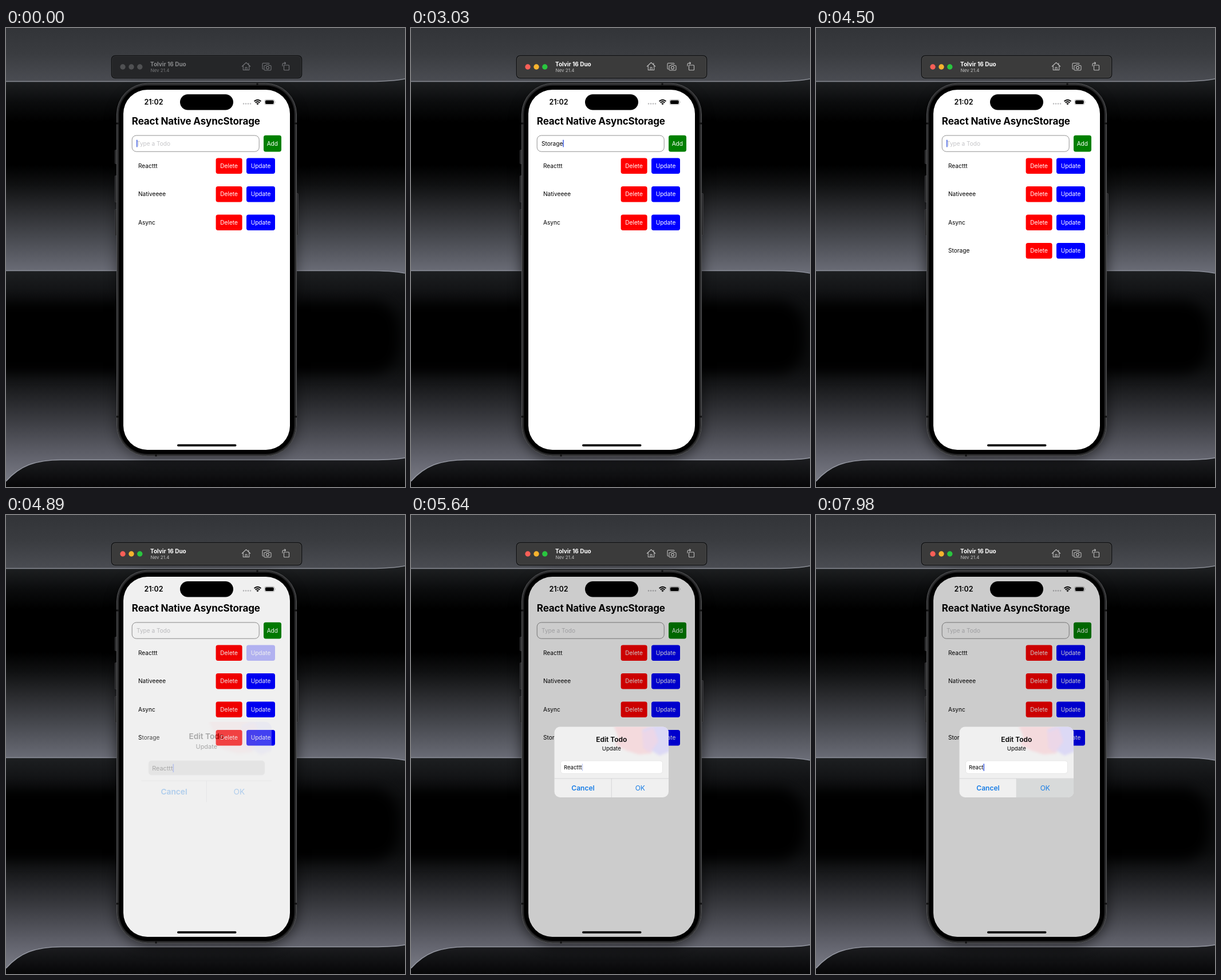
Recreate the animation shown at these times as an HTML page. Size 697 by 803 pixels, loop 8 s.

```html
<!DOCTYPE html>
<html lang="en">
<head>
<meta charset="utf-8">
<title>Todo app demo</title>
<style>
  html, body { margin: 0; width: 100%; height: 100%; overflow: hidden; background: #000; }
  svg { display: block; width: 697px; height: 803px; }
  text { font: 400 10.1px Inter, "Liberation Sans", sans-serif; white-space: pre; }
  .mid { text-anchor: middle; }
  .white { fill: #fff; }
  .link { font-size: 12px; fill: #187de6; }
  .semi { font-weight: 600; }
  #bar { --bg: #3b3b3b; --edge: #555; --title: #fff; --sub: #c4c4c4; --icon: #bdbdbd; --r: #f85f57; --y: #f6b32e; --g: #29c63f; }
  #bar.idle { --bg: #252628; --edge: #3c3d3f; --title: #87888a; --sub: #77787a; --icon: #75767a; --r: #505153; --y: #505153; --g: #505153; }
  #icons { fill: none; stroke: var(--icon); stroke-width: 1.1; stroke-linejoin: round; }
</style>
</head>
<body>
<svg viewBox="0 0 697 803">
  <defs id="defs">
    <filter id="soft" x="-30%" y="-30%" width="160%" height="160%"><feGaussianBlur stdDeviation="11"/></filter>
    <filter id="haze" x="-30%" y="-30%" width="160%" height="160%"><feGaussianBlur stdDeviation="2"/></filter>
    <clipPath id="screen"><rect x="205" y="108" width="291" height="630" rx="42"/></clipPath>
    <clipPath id="card"><rect x="250.5" y="370.5" width="199.5" height="123.5" rx="10"/></clipPath>
  </defs>

  <g id="wall">
    <rect width="697" height="96" fill="url(#band1)"/>
    <path d="M0 93.500H635Q675 93.500 697 89V430H0Z" fill="url(#band2)"/>
    <path d="M0 424.500H630Q675 424.500 697 429V803H0Z" fill="url(#band3)"/>
    <rect x="-60" y="478" width="748" height="126" rx="50" filter="url(#soft)"/>
    <path d="M0 793C24 766 50 756 96 755.500H640Q680 755.500 697 752V803H0Z" fill="url(#band4)"/>
    <g fill="none" stroke-width="1.500">
      <path d="M0 93.500H635Q675 93.500 697 89" stroke="#888b93"/>
      <path d="M0 424.500H630Q675 424.500 697 429" stroke="#8b8e99"/>
      <path d="M0 793C24 766 50 756 96 755.500H640Q680 755.500 697 752" stroke="#9497a1"/>
    </g>
  </g>

  <rect id="shadow" x="192" y="104" width="317" height="652" rx="62" filter="url(#soft)"/>

  <g id="bar">
    <rect x="184.500" y="48.500" width="332" height="39" rx="6" fill="var(--bg)" stroke="#101112" stroke-width="1.500"/>
    <rect x="185.500" y="49.500" width="330" height="37" rx="5" fill="none" stroke="var(--edge)" stroke-width=".6"/>
    <circle cx="204" cy="68" r="4.700" fill="var(--r)"/>
    <circle cx="219" cy="68" r="4.700" fill="var(--y)"/>
    <circle cx="233.800" cy="68" r="4.700" fill="var(--g)"/>
    <text x="252" y="66.500" style="font-size:10px;font-weight:700" fill="var(--title)">Tolvir 16 Duo</text>
    <text x="252.500" y="77" style="font-size:8px" fill="var(--sub)">Nev 21.4</text>
    <g id="icons">
      <path d="M412 67.500L419.500 60.500L427 67.500M414.300 66V73.500H424.700V66M423.800 64V61.300M418 73.500V69H421V73.500"/>
      <path d="M450 72H449.500Q448 72 448 70.500V63Q448 61.500 449.500 61.500H458.500Q460 61.500 460 63"/>
      <path d="M452.500 65.500H454L455 64H458.500L459.500 65.500H461.500Q463 65.500 463 67V72.500Q463 74 461.500 74H452.500Q451 74 451 72.500V67Q451 65.500 452.500 65.500Z"/>
      <circle cx="457" cy="69.500" r="2.400"/>
      <rect x="485.500" y="65" width="9" height="8.800" rx="1"/>
      <path d="M483 67V64Q483 61.500 485.500 61.500H488M486.500 59.500L488.500 61.500L486.500 63.500"/>
    </g>
  </g>

  <g id="phone">
    <g fill="#29292b" stroke="#4b4b4d" stroke-width=".6">
      <rect x="190.300" y="213.500" width="5" height="24" rx="1"/>
      <rect x="190.300" y="258.500" width="5" height="46" rx="1"/>
      <rect x="190.300" y="317.500" width="5" height="46" rx="1"/>
      <rect x="505.500" y="289.500" width="5" height="73" rx="1"/>
    </g>
    <rect x="193.500" y="97" width="314" height="652" rx="54" fill="#1c1c1d" stroke="#58595b"/>
    <rect x="195.300" y="98.800" width="310.400" height="648.400" rx="52" fill="none" stroke="#333335" stroke-width="1.600"/>
    <rect x="197.500" y="101" width="306" height="644" rx="50"/>
    <path d="M439 96.500V100M262 746V749.500M193 167H197M504 167H508M193 680H197M504 680H508" stroke="#111" stroke-width="3"/>
  </g>

  <g clip-path="url(#screen)">
    <rect x="205" y="108" width="291" height="630" fill="#fff"/>
    <text x="241.500" y="134" class="semi" style="font-size:12.500px">21:02</text>
    <g fill="#b9b9bb">
      <circle cx="415" cy="132.500" r="1.250"/><circle cx="419" cy="132.500" r="1.250"/>
      <circle cx="423" cy="132.500" r="1.250"/><circle cx="427" cy="132.500" r="1.250"/>
    </g>
    <g fill="none" stroke="#000" stroke-width="1.900">
      <path d="M433.600 128.300Q439.500 123 445.400 128.300M435.700 130.800Q439.500 127.400 443.300 130.800"/>
    </g>
    <path d="M437.300 132.200Q439.500 130.300 441.700 132.200L439.500 134.400Z"/>
    <rect x="451.600" y="125.300" width="17.400" height="8.800" rx="2.800" fill="none" stroke="#aaa" stroke-width=".8"/>
    <rect x="452.900" y="126.500" width="14.800" height="6.400" rx="1.700"/>
    <path d="M470 128.300Q471.400 129.700 470 131.100Z" fill="#aaa"/>

    <text x="219.800" y="168.600" style="font-size:17px;font-weight:700;letter-spacing:-.12px">React Native AsyncStorage</text>
    <rect x="220.200" y="188" width="222" height="28.200" rx="7.400" fill="none" stroke="#858585" stroke-width=".9"/>
    <text id="hint" x="228" y="205.700" fill="#c5c5c8">Type a Todo</text>
    <text id="typed" x="228" y="205.700"></text>
    <rect id="caret" y="195.500" width="1.500" height="13" rx=".7" fill="#3c5be0"/>
    <g id="add">
      <rect x="450" y="187.700" width="31" height="28.700" rx="3.700" fill="#008000"/>
      <text x="465.300" y="205.700" class="mid white">Add</text>
    </g>
    <g id="rows"></g>
    <rect id="dim" x="205" y="108" width="291" height="630"/>

    <g id="alert">
      <g clip-path="url(#card)">
        <rect x="250" y="370" width="201" height="125" fill="#f0f0f0"/>
        <g filter="url(#haze)">
          <path d="M354 368H424L428 390L420 417L398 419L376 412L357 402L362 388Z" fill="#f4dadd"/>
          <path d="M404 376L428 366H456V412L434 421L420 412L408 395Z" fill="#dcd9f5"/>
          <path d="M404 380L424 372L432 396L418 416L406 408Z" fill="#ecd7e8"/>
        </g>
        <rect x="350.500" y="461.500" width="100" height="33" id="okBack" fill="#d8dada"/>
        <path d="M250 461H450M350.300 461V494" stroke="#cfcfd1" stroke-width=".8"/>
      </g>
      <text x="350.300" y="397.300" class="mid semi" style="font-size:12px">Edit Todo</text>
      <text x="350.300" y="412" class="mid" style="font-size:9.600px">Update</text>
      <rect id="field" x="261.500" y="430" width="178" height="22.200" rx="4.500" stroke="#dededf" stroke-width=".7"/>
      <text id="edit" x="267" y="444.800" style="font-size:9.500px"></text>
      <rect id="editCaret" y="435" width="1.500" height="13" rx=".7" fill="#3c5be0"/>
      <text x="300.500" y="482.400" class="mid link semi">Cancel</text>
      <text x="400.300" y="482.400" class="mid link">OK</text>
    </g>
    <rect x="304" y="116" width="93" height="27.500" rx="13.750"/>
    <rect x="299" y="728.200" width="103.500" height="3.800" rx="1.900"/>
  </g>
</svg>

<script>
const LOOP = 8000;
const $ = id => document.getElementById(id);
const clamp = v => Math.max(0, Math.min(1, v));

// Vertical wallpaper gradients: "y colour" stops
function band(id, stops) {
  const list = stops.split(',').map(s => s.trim().split(' '));
  const top = +list[0][0], bottom = +list[list.length - 1][0];
  const inner = list.map(([y, c]) =>
    `<stop offset="${(y - top) / (bottom - top)}" stop-color="${c}"/>`).join('');
  $('defs').insertAdjacentHTML('beforeend',
    `<linearGradient id="${id}" gradientUnits="userSpaceOnUse" x1="0" x2="0" y1="${top}" y2="${bottom}">${inner}</linearGradient>`);
}
band('band1', '0 #323438, 45 #3a3c40, 93 #4a4c52');
band('band2', '93 #1d1f21, 130 #0b0c0d, 165 #000, 240 #000, 275 #101112, 315 #292a2d, 365 #46484e, 424 #696b75');
band('band3', '425 #1d1f21, 465 #111214, 500 #0c0d0e, 590 #0c0d0e, 625 #17181a, 680 #37383d, 755 #64656f, 800 #7c7e88');
band('band4', '756 #1b1c1f, 803 #060607');

const rows = ['Reacttt', 'Nativeeee', 'Async', 'Storage'];
const button = (x, y, w, fill, label, id) => `<g id="${id}">
  <rect x="${x}" y="${y - 13.7}" width="${w}" height="27.500" rx="3.700" fill="${fill}"/>
  <text x="${x + w / 2}" y="${y + 3.7}" class="mid white">${label}</text></g>`;
$('rows').innerHTML = rows.map((name, i) => {
  const y = 241.1 + 49.55 * i;
  return `<g id="row${i}"><text x="231" y="${y + 3.7}">${name}</text>` +
    button(366.6, y, 46, '#f00', 'Delete', 'delete' + i) +
    button(420, y, 50, '#00f', 'Update', 'update' + i) + '</g>';
}).join('');

// [time, text]; every entry also restarts the caret blink
const typing = [[0, ''], [840, 'S'], [1620, 'St'], [1770, 'Sto'], [1830, 'Stor'],
  [1920, 'Stora'], [2070, 'Storag'], [2130, 'Storage'], [3600, '']];
const editing = [[0, 'Reacttt'], [5110, 'Reacttt'], [6150, 'Reactt'], [6450, 'React'],
  [6600, 'Reac'], [7620, 'React']];

const last = (steps, t) => steps.filter(s => s[0] <= t).pop();

function blink(age) {
  const t = age % 1000;
  return t < 700 ? 1 - clamp((t - 440) / 130) : clamp((t - 800) / 100);
}

function showText(text, caret, steps, t) {
  const [since, value] = last(steps, t);
  if (text.textContent !== value) text.textContent = value;
  const width = value ? text.getComputedTextLength() : 0;
  caret.setAttribute('x', +text.getAttribute('x') + width);
  caret.setAttribute('opacity', blink(t - since));
  return value;
}

const ease = k => k < .5 ? 2 * k * k : 1 - 2 * (1 - k) ** 2;
const press = (t, down, up) =>
  1 - .8 * (ease(clamp((t - down) / 150)) - ease(clamp((t - up) / 250)));

// Critically damped spring from 0 to 1
function spring(t, start) {
  const k = Math.max(0, t - start) * .012;
  return 1 - (1 + k) * Math.exp(-k);
}

function draw(t) {
  const active = t >= 540;
  $('bar').classList.toggle('idle', !active);
  $('shadow').setAttribute('opacity', active ? .55 : .4);

  const value = showText($('typed'), $('caret'), typing, t);
  $('hint').setAttribute('opacity', value ? 0 : 1);
  if (t >= 4800) $('caret').setAttribute('opacity', 0);
  $('add').setAttribute('opacity', press(t, 3390, 3600));
  $('row3').setAttribute('opacity', t >= 3600 ? 1 : 0);
  $('update0').setAttribute('opacity', press(t, 4770, 4920));

  const p = spring(t, 4800);
  const grey = Math.round(180 + 75 * p);
  $('dim').setAttribute('opacity', .2 * p);
  $('alert').setAttribute('opacity', p);
  $('alert').setAttribute('transform',
    `translate(350.300 432.300) scale(${1.2 - .2 * p}) translate(-350.300 -432.300)`);
  $('field').setAttribute('fill', `rgb(${grey},${grey},${grey})`);
  showText($('edit'), $('editCaret'), editing, t);
  if (t < 5110) $('editCaret').setAttribute('opacity', 1);
  $('okBack').setAttribute('opacity', t >= 7980 ? 1 : 0);
}

const begin = performance.now();
function tick() {
  draw((performance.now() - begin) % LOOP);
  requestAnimationFrame(tick);
}
draw(0);
requestAnimationFrame(tick);
</script>
</body>
</html>
```
